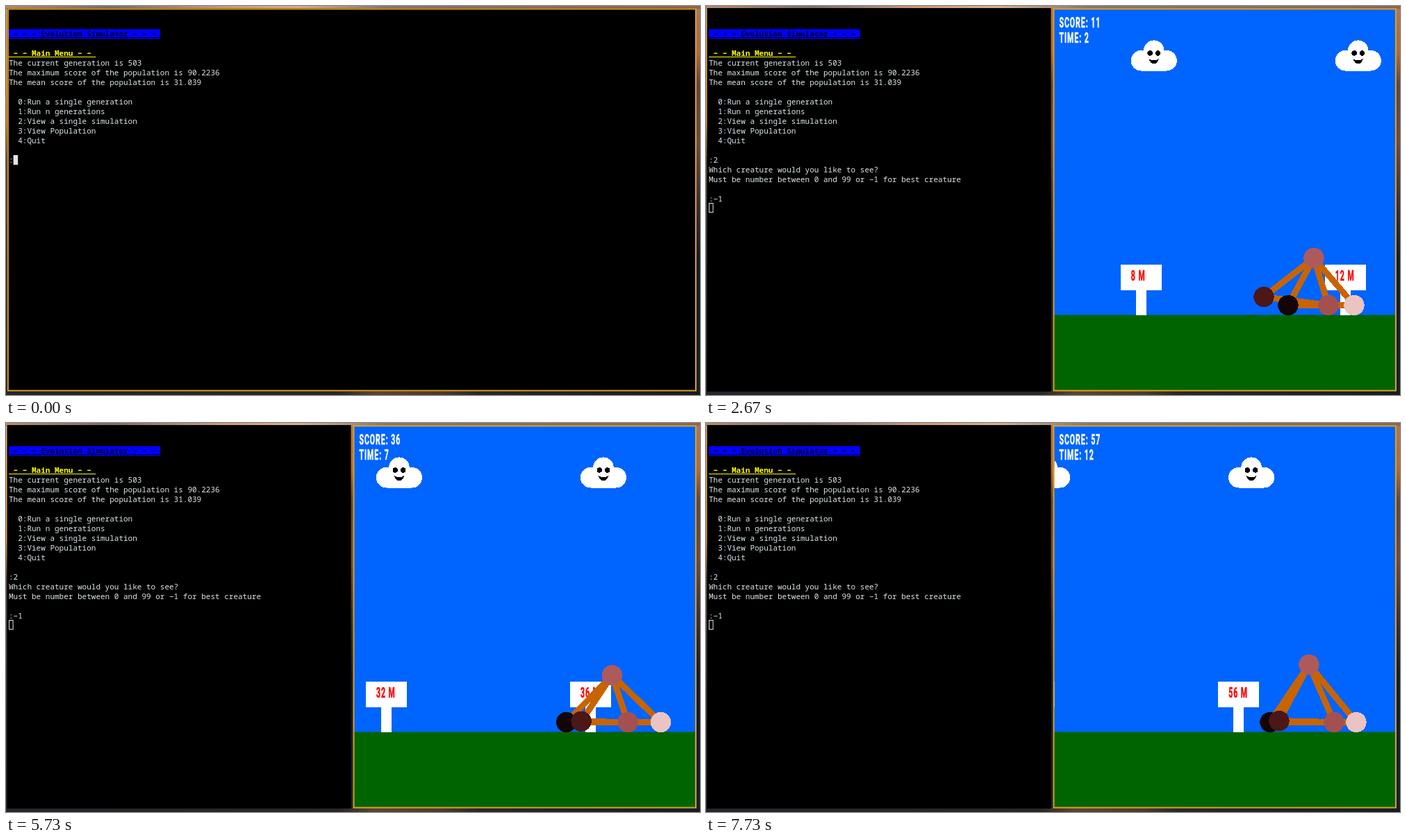
Recreate the animation shown at these times as an HTML page. Size 999x561 px, loop 8 s.

```html
<!DOCTYPE html>
<html lang="en">
<head>
<meta charset="utf-8">
<title>Evolution Simulator</title>
<style>
html, body { margin: 0; width: 100%; height: 100%; overflow: hidden; background: #000; }
svg { display: block; width: 999px; height: 561px; }
.term text { font: 11px "Noto Sans Mono", "DejaVu Sans Mono", monospace; fill: #dce6ea; white-space: pre; }
.term .bold { font-weight: 600; }
.hud { font: bold 21px Roboto, "Open Sans", sans-serif; letter-spacing: 2px; stroke-width: .6; }
#scene { shape-rendering: crispEdges; }
</style>
</head>
<body>
<svg viewBox="0 0 999 561" xmlns="http://www.w3.org/2000/svg">
  <defs>
    <linearGradient id="side" x2="0" y2="1">
      <stop offset="0" stop-color="#a8795c"/><stop offset=".12" stop-color="#b06a3c"/>
      <stop offset=".2" stop-color="#5d463f"/><stop offset=".35" stop-color="#6b4a41"/>
      <stop offset=".5" stop-color="#3a2f38"/><stop offset=".65" stop-color="#141c2c"/>
      <stop offset="1" stop-color="#17202c"/>
    </linearGradient>
    <linearGradient id="left" x2="0" y2="1">
      <stop offset="0" stop-color="#e8b060"/><stop offset=".2" stop-color="#f4a834"/>
      <stop offset=".3" stop-color="#e89a30"/><stop offset=".4" stop-color="#5a4a40"/>
      <stop offset="1" stop-color="#24282e"/>
    </linearGradient>
    <linearGradient id="top">
      <stop offset="0" stop-color="#b98a68"/><stop offset=".15" stop-color="#7d6a68"/>
      <stop offset=".3" stop-color="#c69878"/><stop offset=".42" stop-color="#d8b090"/>
      <stop offset=".55" stop-color="#8a746c"/><stop offset="1" stop-color="#8d6450"/>
    </linearGradient>
    <linearGradient id="base">
      <stop offset="0" stop-color="#23262c"/><stop offset=".48" stop-color="#2a2628"/>
      <stop offset=".53" stop-color="#5c4432"/><stop offset=".63" stop-color="#4c392e"/>
      <stop offset=".68" stop-color="#28272b"/><stop offset="1" stop-color="#161c26"/>
    </linearGradient>
    <clipPath id="view"><rect x="501.5" y="5" width="490.5" height="548.5"/></clipPath>
    <g id="cloud">
      <g fill="#fff">
        <circle cx="-18.3" cy="78.7" r="14.8"/><circle cx="18.3" cy="78.7" r="14.8"/>
        <circle cy="64.2" r="14.8"/><rect x="-18.3" y="70" width="36.6" height="23.5"/>
      </g>
      <circle cx="-5.7" cy="68" r="3.7"/><circle cx="5.7" cy="68" r="3.7"/>
      <path d="M-7.3 76Q0 81 7.3 76Q5 83.3 0 83.3T-7.3 76Z"/>
    </g>
    <path id="board" fill="#fff" d="M-29.4 373h58.8v36.5h-22v36h-14.8v-36h-22z"/>
  </defs>
  <rect width="999" height="561" fill="url(#side)"/>
  <rect width="3" height="561" fill="url(#left)"/>
  <rect width="999" height="4" fill="url(#top)"/>
  <rect y="555" width="999" height="6" fill="url(#base)"/>
  <rect id="pane" y="3" height="553"/>
  <g class="term" id="term"></g>
  <g id="game">
    <rect x="501" y="5" width="491.5" height="441" fill="#0064ff"/>
    <rect x="501" y="445.5" width="491.5" height="108.5" fill="#006400"/>
    <g id="scene" clip-path="url(#view)"></g>
  </g>
  <rect id="frame" y="4.3" height="550.4" fill="none" stroke="#dca01c" stroke-width="2"/>
</svg>
<script>
const $ = id => document.getElementById(id);
const LOOP = 8000, ASK = 330, ANSWER = 570, OPEN = 1770;
const CHAR = 6.6, ROW = 14, METRE = 73.5, CENTRE = 869, GROUND = 431.5, TICK = 250;

// Gait: time, metres run, x of tail, head, knee and foot around the centre, height of head and knee
const gait = [
  [1770, 0, -132, 24, 32, 52, 75, 0],
  [2670, 8.67, -31, 6, -66, 27, 68, 12],
  [3630, 17.68, -35, -3, -53, 6, 66, 6],
  [4670, 26.47, -37, -3, -52, 24, 62, 0],
  [6530, 43.44, -96, 12, -26, 29, 75, 3],
  [7730, 54.76, -57, -1, -44, 35, 83, 2]
];

// The window repaints about every TICK, so progress moves in whole steps.
function sample(t) {
  let i = 0;
  while (i < gait.length - 2 && t >= gait[i + 1][0]) i++;
  const a = gait[i], b = gait[i + 1], span = b[0] - a[0];
  const n = Math.round(span / TICK);
  const k = Math.min(1, Math.floor((t - a[0]) / span * n + 1e-6) / n);
  return a.map((v, j) => v + (b[j] - v) * k);
}

const line = (row, s, attrs = "") => `<text x="4" y="${44 + row * ROW}" ${attrs}>${s}</text>`;

const heading = (row, s, color) => line(row, s, `class="bold" style="fill:${color}"`)
  + `<rect x="4" y="${45 + row * ROW}" width="${s.length * CHAR}" height="1" fill="${color}"/>`;

function cursor(row, col, hollow) {
  const x = 4 + col * CHAR, y = 33 + row * ROW;
  return hollow
    ? `<rect x="${x + .5}" y="${y - .5}" width="5.6" height="13" fill="none" stroke="#dce6ea"/>`
    : `<rect x="${x}" y="${y}" width="${CHAR}" height="${ROW}" fill="#dce6ea"/>`;
}

const menu = `<rect x="4" y="33.4" width="${33 * CHAR}" height="${ROW}" fill="#00f"/>`
  + heading(0, " − − − Evolution Simulator − − − ", "#000020")
  + heading(2, " − − Main Menu − − ", "#ffff00")
  + ["The current generation is 503", "The maximum score of the population is 90.2236",
     "The mean score of the population is 31.039", "", "  0:Run a single generation", "  1:Run n generations",
     "  2:View a single simulation", "  3:View Population", "  4:Quit"].map((s, i) => line(3 + i, s)).join("");

function terminal(t) {
  if (t < ASK) return menu + line(13, ":") + cursor(13, 1);
  const asked = menu + line(13, ":2") + line(14, "Which creature would you like to see?")
    + line(15, "Must be number between 0 and 99 or −1 for best creature");
  if (t < ANSWER) return asked + line(17, ":") + cursor(17, 1);
  return asked + line(17, ":−1") + (t < OPEN ? cursor(17, 3) : cursor(18, 0, true));
}

// condensed display face
const label = (x, y, s, color) =>
  `<text class="hud" transform="translate(${x} ${y}) scale(.5 1)" fill="${color}" stroke="${color}">${s}</text>`;

function signs(run) {
  let out = "";
  for (let m = Math.floor(run / 4) * 4 - 4; m <= run + 8; m += 4) {
    if (m < 0) continue;
    const x = 675.5 + (m - run) * METRE;
    out += `<use href="#cloud" x="${x + 18.5}"/><use href="#board" x="${x}"/>`
      + label(x - 14.5, 395.5, m + " M", "#f00");
  }
  return out;
}

function creature(time, tail, head, knee, foot, headUp, kneeUp) {
  const fall = Math.max(0, 1 - (time - OPEN) / 900);
  const joint = (x, up, color) => ({ x: CENTRE + x, y: GROUND - up, color });
  const f = joint(foot, 7 * fall, "#a55050"), t = joint(tail, 0, "#140505"),
    h = joint(head, headUp, "#af5a5a"), k = joint(knee, kneeUp, "#4b1717"),
    // the camera keeps the mean of all joints centred
    toe = joint(-tail - head - knee - foot, 95 * fall, "#ebc3c3");
  const links = [[f, t], [f, h], [f, k], [f, toe], [h, t], [h, k], [h, toe]];
  return links.map(([a, b]) => `<path d="M${a.x} ${a.y}L${b.x} ${b.y}" stroke="#c86400" stroke-width="8.8"/>`).join("")
    + [f, t, h, k, toe].map(j => `<circle cx="${j.x}" cy="${j.y}" r="14.7" fill="${j.color}"/>`).join("");
}

function scene(t) {
  const [time, run, ...pose] = sample(t);
  const score = Math.floor(run + 2.63), clock = Math.floor((time - OPEN) * .00203 + .4);
  return signs(run) + creature(time, ...pose)
    + label(508.5, 31, "SCORE: " + score, "#fff") + label(508.5, 53, "TIME: " + clock, "#fff");
}

function place(id, x, width) {
  $(id).setAttribute("x", x);
  $(id).setAttribute("width", width);
}

function draw(t) {
  const open = t >= OPEN;
  place("pane", 1.5, open ? 495 : 992);
  place("frame", open ? 500.5 : 2.8, open ? 492.5 : 990.2);
  $("term").innerHTML = terminal(t);
  $("game").style.display = open ? "" : "none";
  if (open) $("scene").innerHTML = scene(t);
}

const start = performance.now();
function tick() {
  draw((performance.now() - start) % LOOP);
  requestAnimationFrame(tick);
}
tick();
</script>
</body>
</html>
```
